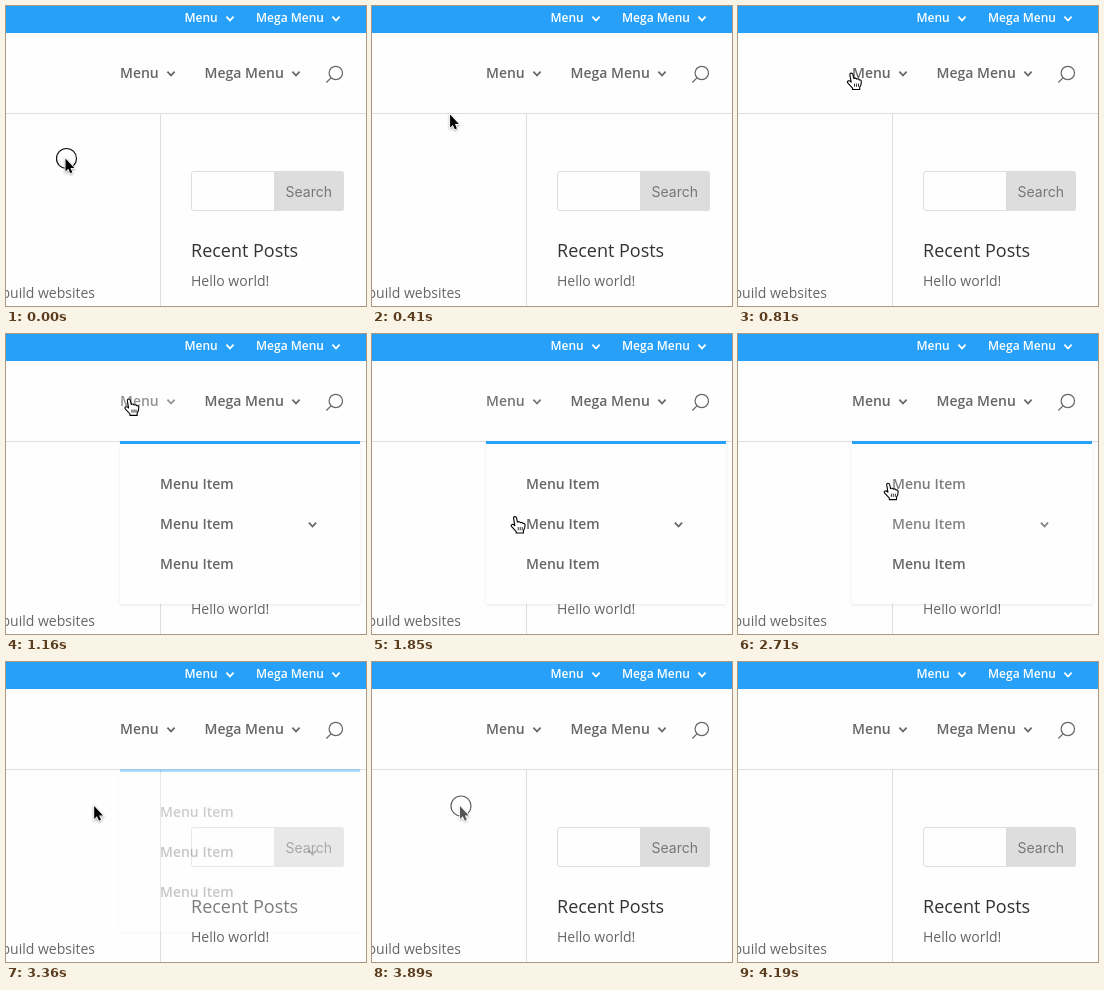
An HTML page for the animation above (5.38 s loop, 360x300 px).

```html
<!DOCTYPE html>
<html lang="en">
<head>
<meta charset="utf-8">
<title>Dropdown menu</title>
<style>
  html, body { margin: 0; height: 100%; overflow: hidden; background: #fefefe; }
  svg { display: block; width: 360px; height: 300px; }
  text { font: 14px "Open Sans", sans-serif; fill: #666; white-space: pre; }
  .nav text { font-weight: 600; }
  .top text { font-size: 12px; fill: #fff; }
  .chev { fill: none; stroke: #666; stroke-width: 1.8; }
  .top .chev { stroke: #fff; }
  .blue { fill: #26a0f8; }
  .panel { fill: #fefefe; filter: drop-shadow(0 1px 1.5px rgba(0, 0, 0, .09)); }
  #arrow { filter: drop-shadow(0 1px 1px rgba(0, 0, 0, .35)); }
</style>
</head>
<body>
<svg viewBox="0 0 360 300">
  <defs><path id="chev" d="M-3.6 -2.3L0 1.5L3.6 -2.3"/></defs>

  <rect class="blue" width="360" height="27"/>
  <g class="nav top">
    <text x="178.5" y="16">Menu</text>
    <use href="#chev" class="chev" x="224" y="13"/>
    <text x="250" y="16">Mega Menu</text>
    <use href="#chev" class="chev" x="330" y="13"/>
  </g>

  <path d="M0 107.5H360M154.5 108V300" stroke="#dedede"/>
  <g class="nav">
    <g id="menu">
      <text x="114" y="72">Menu</text>
      <use href="#chev" class="chev" x="165" y="68"/>
    </g>
    <text x="198.5" y="72">Mega Menu</text>
    <use href="#chev" class="chev" x="290" y="68"/>
  </g>
  <g fill="none" stroke="#666" stroke-width="1.2">
    <circle cx="329.8" cy="67" r="6.7"/>
    <path d="M325 71.8L320.3 76.5"/>
  </g>

  <text x="89" y="292" text-anchor="end">build websites</text>
  <rect x="185.5" y="165.5" width="152" height="39" rx="2.5" fill="none" stroke="#ddd"/>
  <path d="M268 165h67q3 0 3 3v34q0 3-3 3h-67z" fill="#ddd"/>
  <text x="279.5" y="191" style="font-family:Inter,sans-serif;fill:#777">Search</text>
  <text x="185" y="251" style="font-size:18px;fill:#333">Recent Posts</text>
  <text x="185" y="280">Hello world!</text>

  <g id="sub">
    <rect class="panel" x="-126" y="147" width="240" height="62"/>
    <rect class="blue" x="-126" y="147" width="240" height="3"/>
  </g>
  <g id="drop" class="nav">
    <rect class="panel" x="114" y="107" width="240" height="163"/>
    <rect class="blue" x="114" y="107" width="240" height="3"/>
    <text id="item1" x="154" y="155">Menu Item</text>
    <g id="item2">
      <text x="154" y="195">Menu Item</text>
      <use href="#chev" class="chev" x="306.5" y="191"/>
    </g>
    <text x="154" y="235">Menu Item</text>
  </g>

  <g id="pointer">
    <circle id="ring" cx="1.5" cy=".5" r="10" fill="none" stroke="#111" stroke-width="1.2"/>
    <path id="arrow" d="M.5 .5V13.4L3.3 10.8L5.3 15.2L7.3 14.3L5.4 10H9.3Z"
      stroke="#fff" stroke-width="1.6" paint-order="stroke"/>
    <g id="hand" transform="translate(-5.5 -1)" fill="#fff" stroke="#000" stroke-width="1.1" stroke-linejoin="round">
      <path d="M4.6 10L3.4 3Q3.2 1 4.6 1T6.4 2.6L7.2 6.4Q9.4 5.4 10 7Q12 6.2 12.6 7.8Q14.8 7.4 14.8 9.6Q14.8 13 13.2 15V17.4H6V16L1.2 10.8Q.4 9.2 1.8 8.8T4.6 10Z"/>
      <path d="M8 11.5v3.2M10 11.5v3.2M12 11.5v3.2" stroke-width=".8"/>
    </g>
  </g>
</svg>
<script>
const LOOP = 5380;
const el = id => document.getElementById(id);

const ramp = (t, from, to) => Math.min(1, Math.max(0, (t - from) / (to - from)));
const ease = k => k * k * (3 - 2 * k);

const START = { x: 59, y: 152 };
// Each move eases to its end point; bow bends it vertically
const moves = [
  { from: 60, to: 1050, x: 123.5, y: 65, bow: -24 },
  { from: 1280, to: 1950, x: 145, y: 190 },
  { from: 2360, to: 2750, x: 151, y: 148 },
  { from: 3070, to: 3370, x: 87.5, y: 143.5 }
];

function place(t) {
  let { x, y } = START;
  for (const m of moves) {
    const k = ease(ramp(t, m.from, m.to));
    x += (m.x - x) * k;
    y += (m.y - y) * k + (m.bow || 0) * Math.sin(Math.PI * k);
  }
  return [x, y];
}

const fade = (id, value) => el(id).style.opacity = value;
const show = (id, on) => fade(id, on ? 1 : 0);
// Transition in at "on" and out at "off", each lasting ms
const toggle = (t, on, off, ms) => ramp(t, on, on + ms) - ramp(t, off, off + ms);
const hover = (id, t, on, off) => fade(id, 1 - .3 * toggle(t, on, off, 300));
const open = (id, t, on, off) => fade(id, toggle(t, on, off, 220));

function draw(t) {
  el("pointer").setAttribute("transform", `translate(${place(t)})`);
  fade("pointer", 1 - ramp(t, 3750, 4180));
  const hand = t >= 720 && t < 3230;
  show("hand", hand);
  show("arrow", !hand);
  show("ring", t < 60 || t >= 3420);

  hover("menu", t, 860, 1650);
  hover("item1", t, 2560, 3180);
  hover("item2", t, 1890, 2600);
  open("drop", t, 900, 3220);
  open("sub", t, 1900, 2490);
}

function frame(now) {
  draw(now % LOOP);
  requestAnimationFrame(frame);
}
draw(0);
requestAnimationFrame(frame);
</script>
</body>
</html>
```
